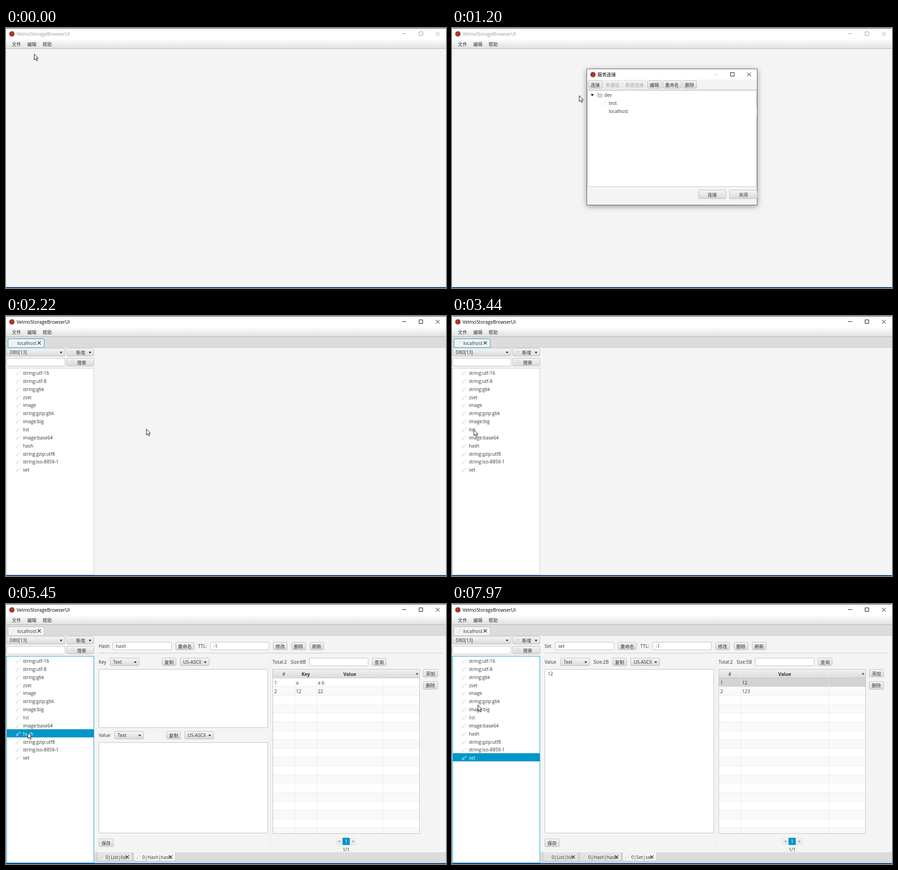
Animation, 974 px wide and 575 px high, one loop 8 s. Source, as an HTML page:

```html
<!DOCTYPE html>
<html lang="zh">
<head>
<meta charset="utf-8">
<title>Key browser demo</title>
<style>
  html, body { margin: 0; width: 100%; height: 100%; overflow: hidden; }
  #stage {
    position: relative; width: 974px; height: 575px; overflow: hidden; background: #f4f4f4;
    font: 10.2px "Open Sans", "Noto Sans CJK SC", "Noto Sans CJK", sans-serif; color: #333;
  }
  #stage div, #stage span, #stage svg { position: absolute; box-sizing: border-box; white-space: pre; }
  span { line-height: 16px; }
  p { margin: 0; }
  svg { overflow: visible; fill: none; stroke: currentColor; }

  .white { background: #fff; }
  .dot { border-radius: 50%; background: #a8392f; }
  .menubar { background: linear-gradient(#fdfdfd, #e2e2e2); border-bottom: 1px solid #b4b4b4; }
  .blue { background: #0096c9; color: #fff; }
  .line { background: #c4c4c4; }
  .grid { background: #e9e9e9; }
  .strip { background: #dcdcdc; }
  .faint { color: #d2d2d2; }
  .bold { font-weight: 700; }
  .mid { transform: translateX(-50%); }

  .btn, .field { display: flex; align-items: center; border: 1px solid #bdbdbd; border-radius: 3px; }
  .btn { justify-content: center; background: linear-gradient(#f5f5f5, #dadada); }
  .off { opacity: .4; }
  .combo { justify-content: flex-start; padding-left: 6px; }
  .combo::after {
    content: ""; position: absolute; right: 5px; top: 7px;
    border: solid transparent; border-width: 4px 3.5px 0; border-top-color: #333;
  }
  .field { background: #fff; padding-left: 6px; }
  .area { display: block; padding: 3px 6px; line-height: 12px; border-radius: 2px; }
  .list { background: #fff; border: 1px solid #c8c8c8; }
  .tab { border: 1px solid #bcbcbc; border-radius: 3px 3px 0 0; background: #f4f4f4; }
  .low { border-radius: 0 0 3px 3px; border-top: 0; background: #e4e4e4; }
  .current { background: #f4f4f4; }
  .head { background: linear-gradient(#f1f1f1, #dcdcdc); border-bottom: 1px solid #c4c4c4; }
  .rows {
    background: repeating-linear-gradient(#fff 0 18.5px, #ededed 18.5px 19.5px, #f9f9f9 19.5px 38px, #ededed 38px 39px);
  }
  .picked { background: #d3d3d3; }
  .frame { border: 1px solid #c0c0c0; }
  .popup { background: #fff; box-shadow: 0 4px 9px rgba(0, 0, 0, .35); }
  .window { background: #f4f4f4; border: 1px solid #5c5c5c; box-shadow: 0 3px 12px rgba(0, 0, 0, .38); }

  /* 1% of the loop is 80 ms */
  .anim { animation: 8s step-end -10ms infinite; }
  #caption { animation-name: active; }
  #menu { animation-name: menu; }
  #item { animation-name: item; }
  #dialog { animation-name: dialog; }
  #server { animation-name: server; }
  #ok { animation-name: ok; }
  #view { animation-name: view; }
  #maintab { animation-name: blur; }
  #keys { animation-name: focus; }
  #used { animation-name: used; }
  #pick0 { animation-name: pick0; }
  #pick1 { animation-name: pick1; }
  #pick2 { animation-name: pick2; }
  #pane0 { animation-name: pane0; }
  #pane1 { animation-name: pane1; }
  #pane2 { animation-name: pane2; }
  #pane1 .fill { animation: fill 8s step-end -10ms infinite; }
  #cursor { animation-name: cursor; }
  #click { animation-name: click; }

  @keyframes active { 0%, 12.625% { color: #999 } 5%, 24%, 100% { color: #000 } }
  @keyframes menu { 0%, 12.625%, 100% { opacity: 0 } 5% { opacity: 1 } }
  @keyframes item { 0% { background: #fff; color: #333 } 8.75%, 100% { background: #0096c9; color: #fff } }
  @keyframes dialog { 0%, 24%, 100% { opacity: 0 } 12.625% { opacity: 1 } }
  @keyframes server {
    0% { background: #fff; color: #333 }
    16.375% { background: #0096c9; color: #fff }
    22.75%, 100% { background: #d3d3d3; color: #2f5a2f }
  }
  @keyframes ok {
    0% { box-shadow: none; border-color: #bdbdbd; filter: none }
    22.75%, 100% { box-shadow: inset 0 0 0 .6px #039ed3; border-color: #039ed3; filter: brightness(.94) }
  }
  @keyframes view { 0% { opacity: 0 } 24%, 100% { opacity: 1 } }
  @keyframes blur { 0% { border-color: #039ed3 } 44.25%, 100% { border-color: #bcbcbc } }
  @keyframes focus { 0% { border-color: #c8c8c8 } 44.25%, 100% { border-color: #039ed3 } }
  @keyframes used { 0% { color: #333 } 44.25%, 100% { color: #4a6426 } }
  @keyframes pick0 { 0%, 62.875%, 100% { opacity: 0 } 44.25% { opacity: 1 } }
  @keyframes pick1 { 0%, 84.75%, 100% { opacity: 0 } 62.875% { opacity: 1 } }
  @keyframes pick2 { 0% { opacity: 0 } 84.75%, 100% { opacity: 1 } }
  @keyframes pane0 { 0%, 66.875%, 100% { opacity: 0 } 46.75% { opacity: 1 } }
  @keyframes pane1 { 0%, 88.5%, 100% { opacity: 0 } 66.875% { opacity: 1 } }
  @keyframes pane2 { 0% { opacity: 0 } 88.5%, 100% { opacity: 1 } }
  @keyframes fill { 0% { opacity: 0 } 69.375%, 100% { opacity: 1 } }
  @keyframes click {
    0%, 6.25%, 12.625%, 17.5%, 24%, 46.75%, 65.375%, 87.25%, 100% { opacity: 0 }
    5%, 11.375%, 16.375%, 22.75%, 44.25%, 62.875%, 83.5% { opacity: 1 }
  }
  @keyframes cursor {
    0% { transform: translate(62px, 57px) }
    1.25% { transform: translate(62px, 57px); animation-timing-function: steps(4, jump-start) }
    6.25% { transform: translate(22px, 36px) }
    7.5% { transform: translate(22px, 36px); animation-timing-function: steps(3, jump-start) }
    11.25% { transform: translate(24px, 54px) }
    12.625% { transform: translate(24px, 54px); animation-timing-function: steps(4, jump-start) }
    17.625% { transform: translate(367px, 181px); animation-timing-function: steps(3, jump-start) }
    21.375% { transform: translate(576px, 365px) }
    24% { transform: translate(576px, 365px); animation-timing-function: steps(7, jump-start) }
    32.75% { transform: translate(111px, 163px) }
    34% { transform: translate(111px, 163px); animation-timing-function: steps(6, jump-start) }
    41.75% { transform: translate(56px, 258px); animation-timing-function: steps(2, jump-start) }
    44.25% { transform: translate(48px, 251px) }
    54.25% { transform: translate(48px, 251px); animation-timing-function: steps(3, jump-start) }
    58% { transform: translate(53px, 331px) }
    59.125% { transform: translate(53px, 331px); animation-timing-function: steps(2, jump-start) }
    61.625% { transform: translate(55px, 297px); animation-timing-function: steps(1, jump-start) }
    62.875% { transform: translate(48px, 284px) }
    76.875% { transform: translate(48px, 284px); animation-timing-function: steps(5, jump-start) }
    83.125% { transform: translate(48px, 336px) }
    97.125% { transform: translate(50px, 298px) }
    98.375% { transform: translate(54px, 260px) }
    99.625%, 100% { transform: translate(57px, 223px) }
  }
</style>
</head>
<body>
<div id="stage"></div>
<script>
const box = (x, y, w, h, cls = '', inner = '', id = '') =>
  `<div ${id && `id="${id}"`} class="${cls}${id && ' anim'}" style="left:${x}px;top:${y}px;width:${w}px;height:${h}px">${inner}</div>`;
const group = (id, inner) => box(0, 0, 974, 575, '', inner, id);
// Text is placed by its left edge and its vertical centre.
const text = (x, cy, s, cls = '', id = '') =>
  `<span ${id && `id="${id}"`} class="${cls}${id && ' anim'}" style="left:${x}px;top:${cy - 8}px">${s}</span>`;
const icon = (x, y, d, cls = '', attrs = '') =>
  `<svg class="${cls}" width="12" height="12" style="left:${x}px;top:${y}px"><path d="${d}" ${attrs}/></svg>`;
const btn = (x, y, w, s, cls = '', h = 18, id = '') => box(x, y, w, h, 'btn ' + cls, s, id);
const combo = (x, y, w, s) => btn(x, y, w, s, 'combo');
const field = (x, y, w, s = '') => box(x, y, w, 18, 'field', s);
const cross = (x, y) => icon(x, y, 'M0 0L7 7M7 0L0 7', '', 'stroke-width="1.4"');
const keyIcon = (x, cy, cls = 'faint') =>
  icon(x, cy - 5, 'M4.5 7.5a2 2 0 1 1-4 0a2 2 0 1 1 4 0M4 6L10 .5M8 2l2 2', cls);
const linkIcon = (x, cy) => icon(x, cy - 5, 'M1 8L6 2L9 1L9 4L4 9Z', 'faint', 'opacity=".6"');
const winButtons = (x, y, minCls = '') =>
  icon(x, y, 'M0 4.5H9', minCls) + icon(x + 37, y, 'M.5 .5h8v8h-8z') + icon(x + 74, y, 'M.5 .5l8.5 8.5M9 .5L.5 9');

const frame =
  box(0, 0, 974, 25, 'white') +
  box(0, 0, 974, 1, '', '<div style="width:974px;height:1px;background:#27446f"></div>') +
  box(7, 6.5, 12, 12, 'dot') +
  group('caption', text(23.5, 13, '<b style="font:10.4px Open Sans,sans-serif">VelmoStorageBrowserUI</b>') + winButtons(877, 8)) +
  box(0, 25, 974, 21, 'menubar') +
  ['文件', '编辑', '帮助'].map((s, i) => text(13 + 34 * i, 35.5, s)).join('');

const menu =
  box(6, 26, 33, 19, 'blue') + text(13, 35.5, '文件', 'blue') +
  box(6, 47, 34, 23, 'popup') + box(7, 50, 33, 17, '', text(5, 8.5, '连接'), 'item');

const dialog =
  box(298, 90, 378, 302, 'window') + box(299, 91, 376, 23, 'white') +
  box(305.5, 96.5, 12, 12, 'dot') +
  `<div style="color:#000">${text(322, 103, '服务连接') + winButtons(578.5, 98, 'faint')}</div>` +
  btn(301, 116, 32, '连接') + btn(334, 116, 43, '新建组', 'off') + btn(379, 116, 50, '新建连接', 'off') +
  btn(432, 116, 32, '编辑') + btn(466, 116, 42, '重命名') + btn(510, 116, 32, '删除') +
  box(299, 136, 376, 1, 'line') + box(299, 138, 376, 213, 'list') +
  icon(307, 145.5, 'M0 0H7L3.5 5Z', '', 'fill="#222" stroke="none"') +
  icon(321.5, 143.5, 'M0 0H4L5 1.5H10V9H0Z', '', 'fill="#d4d4d4" stroke="#bbb"') + text(337, 148, 'dev') +
  linkIcon(331, 166) + text(347, 166, 'test') +
  box(300, 175, 375, 17, '', text(47, 8.5, 'localhost'), 'server') +
  btn(545, 358, 62, '连接', '', 20, 'ok') + btn(614, 358, 62, '关闭', '', 20);

const names = ['string:utf-16', 'string:utf-8', 'string:gbk', 'zset', 'image', 'string:gzip:gbk', 'image:big',
  'list', 'image:base64', 'hash', 'string:gzip:utf8', 'string:iso-8859-1', 'set'];
const rowY = i => 126 + 17.85 * i;
const pick = (i, n) => box(2, Math.round(rowY(i)) - 10, 192, 18, 'blue',
  keyIcon(20, 9.5, 'blue') + text(35.5, 10, names[i]), 'pick' + n);

const view =
  box(0, 46, 974, 24, 'strip') + box(0, 69, 974, 1, 'line') + box(0, 70, 974, 503, '', '') +
  box(4, 50, 81, 20, 'tab', '', 'maintab') + linkIcon(10, 60) + text(25, 60, 'localhost') + cross(70, 56) +
  combo(1, 71, 130, 'DB0[13]') +
  btn(134, 71, 61, '<p style="padding-left:14px">新增</p>', 'combo') + icon(142, 75, 'M4 0V8M0 4H8', 'faint') +
  field(1, 93, 130) + btn(134, 93, 61, '<p style="padding-left:6px">搜索</p>') +
  icon(143, 97, 'M7 3.5a3.5 3.5 0 1 1-7 0a3.5 3.5 0 1 1 7 0M6 6l4 4', 'faint') +
  box(1, 115, 194, 458, 'list', '', 'keys') +
  names.map((s, i) => keyIcon(22, rowY(i)) + text(37.5, rowY(i), s, '', s === 'list' ? 'used' : '')).join('') +
  pick(7, 0) + pick(9, 1) + pick(12, 2);

const editor = (label, dx, top, h, size, body) =>
  text(205, top - 16, label) + combo(240 + dx, top - 25, 65, 'Text') +
  text(313 + dx, top - 16, 'Size:' + size, 'fill') +
  btn(355 + dx, top - 25, 32, '复制') + combo(395 + dx, top - 25, 65, 'US-ASCII') +
  box(205, top, 375, h, 'field area', `<p class="fill">${body}</p>`);

const table = (cols, rows) =>
  box(590, 164, 325, 343, 'rows') + box(590, 164, 325, 19, 'picked fill') +
  box(590, 144, 325, 20, 'head') +
  text(615, 154.5, '#', 'mid') + text(907, 153.5, '+', 'bold') +
  cols.map(([name, x, w]) => box(x, 144, 1, 363, 'grid') + text(x + w / 2, 154.5, name, 'bold mid')).join('') +
  box(834, 144, 1, 363, 'grid') +
  rows.map((row, r) => row.map((s, c) => text(c ? cols[c - 1][1] + 3 : 594, 173.5 + 19.5 * r, s)).join('')).join('') +
  box(590, 144, 326, 364, 'frame');

const tabs = [['List', 'list', 201, 79], ['Hash', 'hash', 282, 94], ['Set', 'set', 377, 77]];
const pane = (n, p) => {
  const [type, key] = tabs[n], x = p.dx;
  return group('pane' + n,
    text(205, 93, type) + field(229 + x, 84, 131, key) + btn(368 + x, 84, 42, '重命名') +
    text(418 + x, 93, 'TTL:') + field(445 + x, 84, 131, '-1') +
    ['修改', '删除', '刷新'].map((s, i) => btn(584 + x + 40.5 * i, 84, 32, s)).join('') +
    box(205, 108, 760, 1, 'line') + box(585, 111, 1, 437, 'grid') +
    p.editors.map(e => editor(...e)).join('') + btn(205, 519, 33, '保存') +
    text(590, 128, 'Total:2') + text(630, 128, 'Size:' + p.size) + field(671, 119, 131) + btn(810, 119, 32, '查询') +
    table(p.cols, p.rows) +
    p.side.map((s, i) => btn(s.length > 2 ? 919 : 923, 144 + 26.7 * i, s.length > 2 ? 42 : 33, s)).join('') +
    btn(731, 517, 14, '', 'off', 16) + btn(762, 517, 13, '', 'off', 16) +
    icon(735, 522, 'M5 0V6L0 3Z', '', 'fill="#aaa" stroke="none"') +
    icon(767, 522, 'M0 0V6L5 3Z', '', 'fill="#aaa" stroke="none"') +
    box(745, 517, 16, 16, 'blue') + text(753, 525, '1', 'blue mid') + text(753, 543, '1/1', 'mid') +
    box(196, 549, 778, 24, 'strip') +
    tabs.slice(0, n + 1).map(([t, k, left, w], i) =>
      box(left, 549, w, 20, 'tab low' + (i === n ? ' current' : '')) + keyIcon(left + 5, 559.5) +
      text(left + 19.5, 559.5, `0|${t}|${k}`) + cross(left + w - 15, 555.5)).join(''));
};

const wide = [['Value', 639, 195]];
const panes =
  pane(0, {
    dx: 0, size: '6B', cols: wide, rows: [['1', '1233'], ['2', '11']],
    editors: [['Value', 0, 144, 363, '4B', '1233']],
    side: ['添加头', '添加尾', '删除头', '删除尾', '删除行']
  }) +
  pane(1, {
    dx: 7, size: '8B', cols: [['Key', 639, 49], ['Value', 687.5, 147]], rows: [['1', 'a', 'a b'], ['2', '12', '22']],
    editors: [['Key', -10, 144, 130, '1B', 'a'], ['Value', 0, 306, 201, '3B', 'a\nb']],
    side: ['添加', '删除']
  }) +
  pane(2, {
    dx: -1, size: '5B', cols: wide, rows: [['1', '12'], ['2', '123']],
    editors: [['Value', 0, 144, 363, '2B', '12']],
    side: ['添加', '删除']
  });

const cursor = box(0, 0, 12, 18, '',
  box(-10, -9, 20, 20, '', '<div style="inset:0;border-radius:50%;background:rgba(250,238,20,.65)"></div>', 'click') +
  icon(0, 0, 'M.5 .5V13.5L3.5 10.8L5.7 15.6L7.8 14.7L5.6 10H9.6Z', '', 'fill="#fff" stroke="#000"'), 'cursor');

document.getElementById('stage').innerHTML =
  frame + group('menu', menu) + group('view', view) + panes + group('dialog', dialog) +
  '<div style="left:0;top:573px;width:974px;height:2px;background:#123f86"></div>' + cursor;
</script>
</body>
</html>
```
